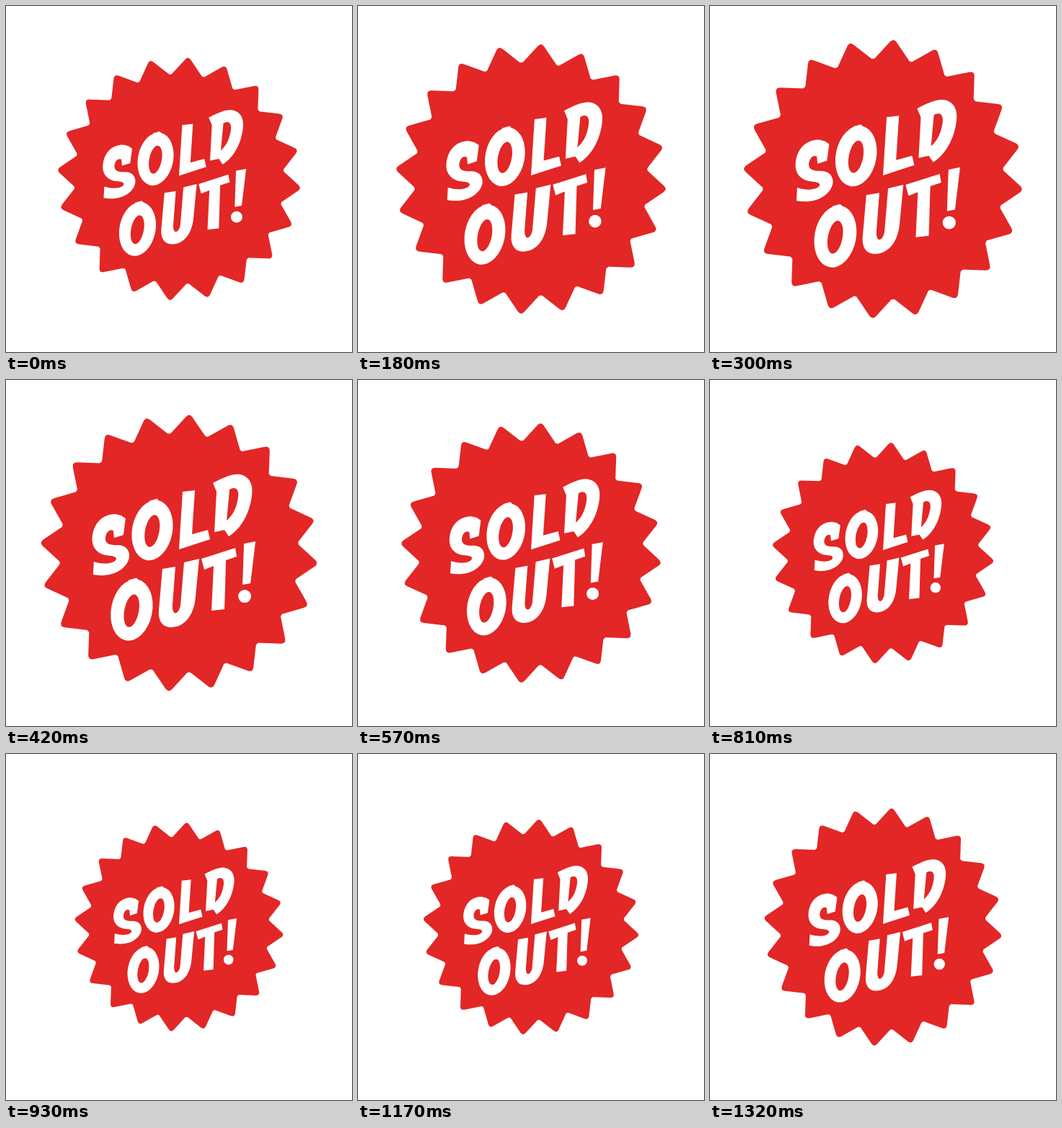
An HTML page without scripts that plays this animation: 480x480 px, repeating every 1.35 s.

```html
<!DOCTYPE html>
<html lang="en">
<head>
<meta charset="utf-8">
<title>Sold out badge</title>
<style>
  @property --phase {
    syntax: "<angle>";
    inherits: false;
    initial-value: 0deg;
  }
  html, body {
    margin: 0;
    height: 100%;
    overflow: hidden;
    background: #fff;
  }
  svg {
    display: block;
    width: 100%;
    height: 100%;
  }
  .red { fill: #e22726; }
  .white { fill: #fff; }
  /* Sine pulse, 45 steps of 30 ms; the small lead keeps steps off the tick edge. */
  .badge {
    transform-origin: 240px 240px;
    transform: scale(calc(.8785 + .1325 * sin(var(--phase))));
    animation: pulse 1350ms steps(45) -1ms infinite;
  }
  @keyframes pulse {
    from { --phase: 0deg; }
    to { --phase: 360deg; }
  }
</style>
</head>
<body>
<svg viewBox="0 0 480 480" role="img" aria-label="SOLD OUT!">
  <defs>
    <path id="spike" d="M0 0L-25.7-162.1L-4.7-188.7Q0-194.6 4.7-188.7L25.7-162.1Z"/>
    <g id="quarter">
      <use href="#spike"/>
      <use href="#spike" transform="rotate(18)"/>
      <use href="#spike" transform="rotate(36)"/>
      <use href="#spike" transform="rotate(54)"/>
      <use href="#spike" transform="rotate(72)"/>
    </g>
    <g id="letter-o">
      <ellipse rx="28.5" ry="43"/>
      <path d="M-12-40L-2-45L4-41L-9-32Z"/>
      <ellipse class="red" cy="1" rx="10" ry="23"/>
    </g>
  </defs>

  <g class="badge">
    <g class="red" transform="translate(240 240) rotate(4.3)">
      <circle r="166"/>
      <use href="#quarter"/>
      <use href="#quarter" transform="rotate(90)"/>
      <use href="#quarter" transform="rotate(180)"/>
      <use href="#quarter" transform="rotate(270)"/>
    </g>

    <g class="white">
      <!-- S -->
      <path d="M160 188L166 192L163 215L150 219L149 209C142 206 138 214 138 221C139 229 147 229 157 229C168 230 172 238 171 246C168 262 148 275 121 270L122 252C138 257 152 254 153 248C153 244 146 244 138 243C124 240 118 229 120 216C123 196 136 186 152 186Z"/>
      <!-- O -->
      <use href="#letter-o" transform="translate(203 208.5) rotate(11) scale(.98)"/>
      <!-- L -->
      <path d="M245 155L262 153L258 214L280 208L283 221L240 235Z"/>
      <!-- D -->
      <path d="M287 143C300 136 313 130 323 131C338 133 343 146 341 160C338 186 325 207 309 217L303 208L289 211L292 155Z"/>
      <path class="red" d="M310 152C319 147 323 152 322 162C320 177 315 187 306 195Z"/>
      <!-- O -->
      <use href="#letter-o" transform="translate(174.5 319) rotate(11)"/>
      <!-- U -->
      <path d="M217 262L235 259L231 312C230 327 239 327 242 313L247 253L268 248L263 300C261 327 247 343 229 343C217 343 211 334 212 320Z"/>
      <!-- T -->
      <path d="M271 248L318 233L320 245L305 250L303 318L285 320L288 258L275 263Z"/>
      <!-- ! -->
      <path d="M330 227L346 224L339 282L328 284Z"/>
      <circle cx="331" cy="300" r="9"/>
    </g>
  </g>
</svg>
</body>
</html>
```
